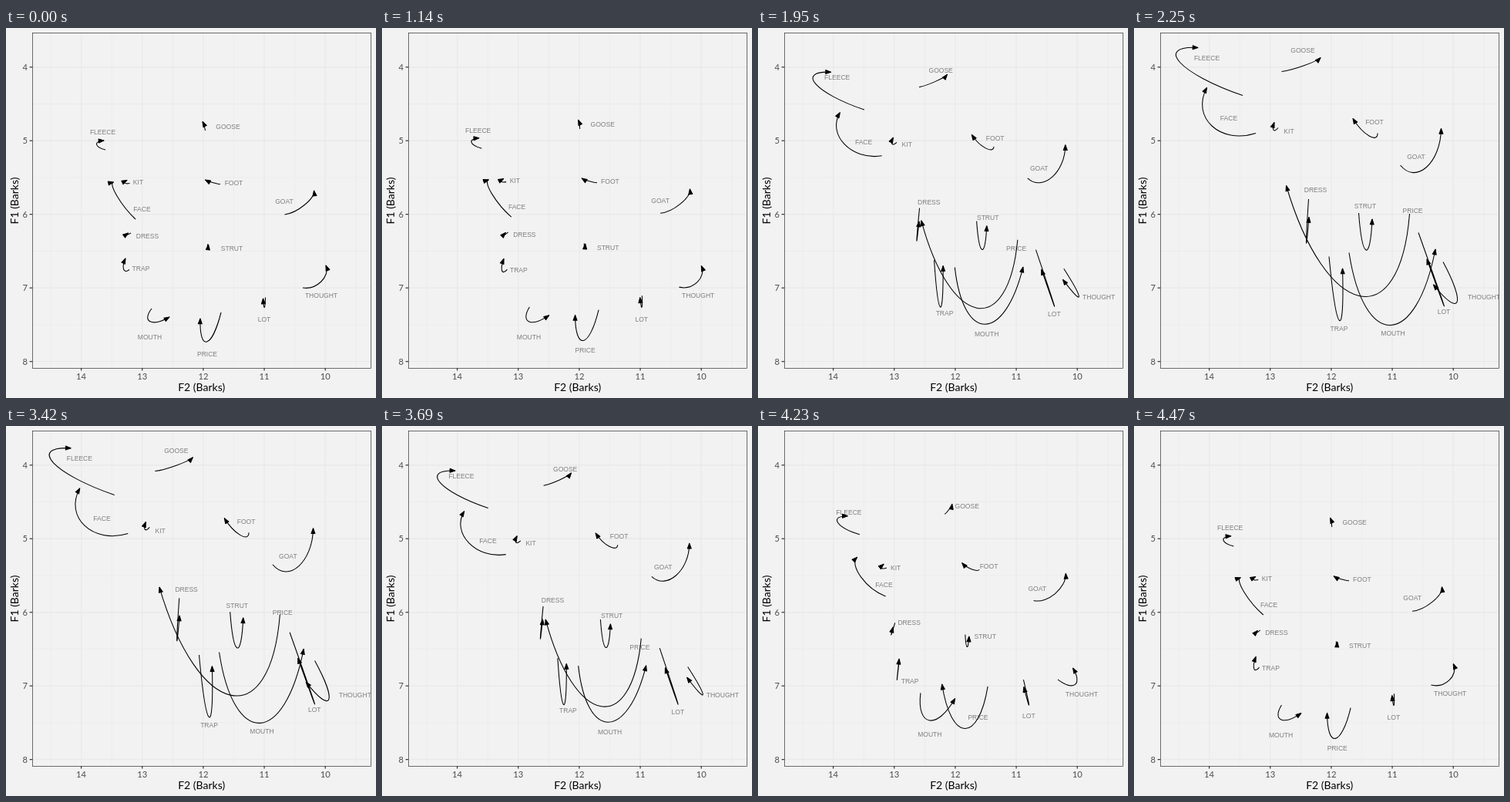
Write an HTML page that moves like this. It is 480 px wide and 480 px high and loops after 4.5 s.

```html
<!DOCTYPE html>
<html lang="en">
<head>
<meta charset="utf-8">
<title>Vowel trajectories</title>
<style>
  html, body { margin: 0; width: 100%; height: 100%; overflow: hidden; background: #f2f2f2; }
  svg { display: block; width: 100%; height: 100%; }
  .major, .minor { stroke: #e9e9e9; fill: none; }
  .major { stroke-width: 1.36; }
  .minor { stroke-width: .68; }
  .tick { stroke: #333; stroke-width: 1.2; }
  .border { fill: none; stroke: #333; stroke-width: .7; }
  .axis { font: 11.2px Lato, "Open Sans", sans-serif; fill: #4d4d4d; }
  .title { font: 14px Lato, "Open Sans", sans-serif; fill: #000; text-anchor: middle; }
  .label { font: 8.54px "Liberation Sans", Arial, sans-serif; fill: #7f7f7f; text-anchor: middle; }
  .curve { fill: none; stroke: #000; stroke-width: 1.07; }
  .head { fill: #000; stroke: #000; stroke-width: 1.07; stroke-linejoin: round; }
</style>
</head>
<body>
<svg viewBox="0 0 480 480">
  <clipPath id="panel"><rect x="34" y="6" width="440" height="435.5"/></clipPath>
  <g id="grid"></g>
  <g clip-path="url(#panel)">
    <g id="labels"></g>
    <g id="curves"></g>
  </g>
  <rect class="border" x="34.5" y="6.5" width="439" height="435"/>
  <g id="axes"></g>
  <text class="title" x="253.7" y="471">F2 (Barks)</text>
  <text class="title" transform="translate(16 224) rotate(-90)">F1 (Barks)</text>
</svg>
<script>
const STEP = 30, STEPS = 150;
const HEAD = 7.2, SPREAD = Math.PI / 9;
const FULLNESS = .3;

const el = id => document.getElementById(id);

function make(parent, tag, attrs, text) {
  const node = document.createElementNS('http://www.w3.org/2000/svg', tag);
  for (const key in attrs) node.setAttribute(key, attrs[key]);
  if (text !== undefined) node.textContent = text;
  return parent.appendChild(node);
}

// Axis scales, in barks; F2 runs right to left
const xAt = f2 => 255.9 + (12 - f2) * 79.15;
const yAt = f1 => 241.7 + (f1 - 6) * 95.48;

function vLine(f2, cls) {
  make(el('grid'), 'path', { class: cls, d: `M${xAt(f2)} 7V441` });
}
function hLine(f1, cls) {
  make(el('grid'), 'path', { class: cls, d: `M35 ${yAt(f1)}H473` });
}

for (let v = 9.5; v < 15; v++) vLine(v, 'minor');
for (let v = 4.5; v < 8; v++) hLine(v, 'minor');
for (let v = 10; v <= 14; v++) {
  vLine(v, 'major');
  make(el('axes'), 'path', { class: 'tick', d: `M${xAt(v)} 441v3.6` });
  make(el('axes'), 'text', { class: 'axis', x: xAt(v), y: 456, 'text-anchor': 'middle' }, v);
}
for (let v = 4; v <= 8; v++) {
  hLine(v, 'major');
  make(el('axes'), 'path', { class: 'tick', d: `M30.6 ${yAt(v)}h3.6` });
  make(el('axes'), 'text', { class: 'axis', x: 28, y: yAt(v) + 4, 'text-anchor': 'end' }, v);
}

// A pose is written "label start bend end", each point as x,y
const parse = pose => pose.split(' ').map(pt => pt.split(',').map(Number));

const vowels = [];
function vowel(name, from, to) {
  vowels.push({
    from: parse(from),
    to: parse(to),
    label: make(el('labels'), 'text', { class: 'label' }, name),
    curve: make(el('curves'), 'path', { class: 'curve' }),
    head: make(el('curves'), 'path', { class: 'head' })
  });
}

vowel('FLEECE', '125.5,135 129,158 117.5,151 127,146', '94.5,39 141,87.5 60,45 83,25.5');
vowel('GOOSE', '288,128 258.5,133 257,127 255,121.5', '219,29 191.5,56.5 220.5,48.8 242,38.5');
vowel('KIT', '171.5,200 160.5,201.5 154,201 157,197.5', '201,134 187,129.5 181,132.3 182,122.5');
vowel('FOOT', '295.5,201 278,202.5 268,200.4 258.5,197', '312,122 316,136.5 305,140 284,117.5');
vowel('FACE', '176.5,235 168,248 144,218 139.5,200', '123,117 158,136.5 101,127 94.5,77.5');
vowel('GOAT', '361,225 361.5,242 387.3,229.5 399.5,211', '366,167 345.5,178 379.5,180.5 398.5,130.5');
vowel('DRESS', '183.5,270 162,266 156.6,268.3 158.5,266', '235.5,210 226.5,222 223.5,278 227,245.5');
vowel('STRUT', '293,286 261.5,280.5 261.7,286 262.5,281', '300,231 291.5,240 301,288 309,248');
vowel('TRAP', '175,312 160,313.5 152.6,313 155,299', '266,390 253,296.5 266.5,379.5 270.5,312');
vowel('THOUGHT', '409,347 385,337 408.8,329 415,308', '454,349 401,303.5 419,355.5 388.5,333');
vowel('MOUTH', '186.5,401 189,364 187,380.8 212,375', '336,396 279,291.5 333,385.5 391,287');
vowel('LOT', '335,378 336.5,349.5 335.3,362.5 333.5,351', '402,368 369,265.5 402,359.5 380,300');
vowel('PRICE', '261,423 279,369 260.5,407 252,377', '361.5,236.8 357.5,241 292,347.5 197.5,204.5');

const mix = (a, b, p) => a.map((n, i) => n + (b[i] - n) * p);

// Bezier handle so the curve meets the bend halfway, spread along the chord
const handle = (start, bend, end, side) => bend.map((m, i) =>
  (8 * m - start[i] - end[i]) / 6 + side * FULLNESS * (end[i] - start[i]));

function corner([x, y], angle) {
  return [x - HEAD * Math.cos(angle), y - HEAD * Math.sin(angle)];
}

function draw(p) {
  for (const v of vowels) {
    const [label, start, bend, end] = v.from.map((pt, i) => mix(pt, v.to[i], p));
    const h1 = handle(start, bend, end, -1);
    const h2 = handle(start, bend, end, 1);
    const dir = Math.atan2(end[1] - h2[1], end[0] - h2[0]);
    v.label.setAttribute('x', label[0]);
    v.label.setAttribute('y', label[1] + 3.06);
    v.curve.setAttribute('d', `M${start}C${h1} ${h2} ${end}`);
    v.head.setAttribute('d',
      `M${corner(end, dir - SPREAD)}L${end}L${corner(end, dir + SPREAD)}Z`);
  }
}

// Hold, linear move out, hold, linear move back
function progress(k) {
  if (k < 38) return 0;
  if (k < 75) return (k - 37) / 38;
  if (k < 113) return 1;
  return (STEPS - k) / 37;
}

let origin, last = -1;
function tick(now) {
  if (origin === undefined) origin = now;
  const k = Math.floor(Math.max(0, now - origin) / STEP + 1e-6) % STEPS;
  if (k !== last) draw(progress(last = k));
  requestAnimationFrame(tick);
}
draw(0);
requestAnimationFrame(tick);
</script>
</body>
</html>
```
